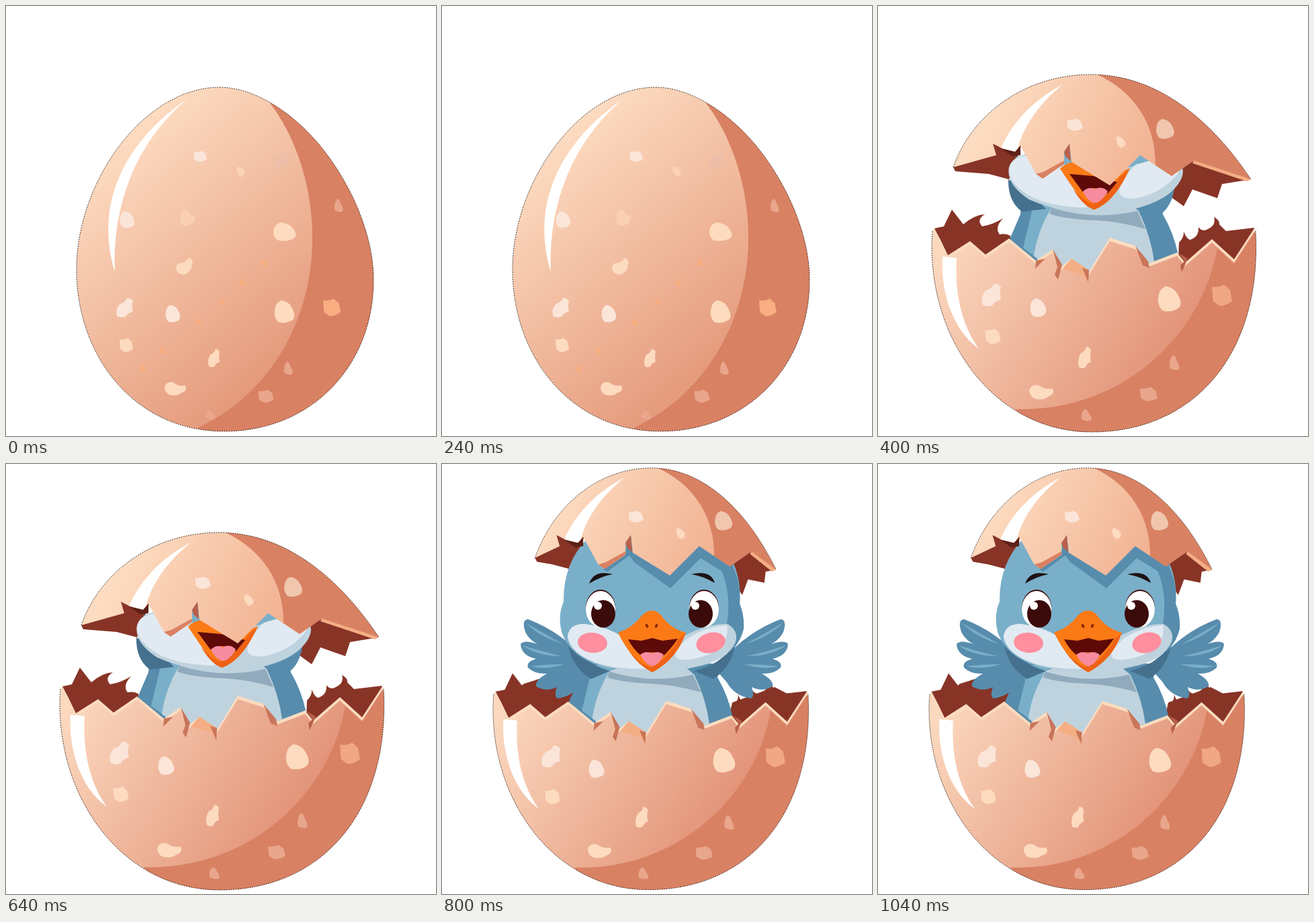
Write an HTML page that moves like this. It is 640x640 px and loops after 1200 ms.

```html
<!DOCTYPE html>
<html lang="en">
<head>
<meta charset="utf-8">
<title>Hatching egg</title>
<style>
  html, body { margin: 0; width: 100%; height: 100%; overflow: hidden; background: #fff; }
  svg { display: block; width: 100vw; height: 100vh; }
</style>
</head>
<body>
<svg id="stage" viewBox="0 0 640 640"></svg>
<script>
const C = {
  shade: '#d98163', inner: '#873426', rim: '#fcdcbf', crack: '#c9755a', peach: '#f5ae84',
  pale: '#fbe5d9', cream: '#fddbbf', dim: '#e9a68c',
  sky: '#7aafc9', blue: '#578cad', navy: '#45718f', mist: '#bfd3de', snow: '#e1eaf2',
  beak: '#fb7a16', beakDark: '#ee6216', mouth: '#5e0a08', tongue: '#f78ba0', ink: '#3b0a0a'
};

const path = (d, fill, extra = '') => `<path d="${d}" fill="${fill}" ${extra}/>`;
const oval = (x, y, rx, ry, fill, turn = 0) =>
  `<ellipse cx="${x}" cy="${y}" rx="${rx}" ry="${ry}" fill="${fill}" transform="rotate(${turn} ${x} ${y})"/>`;
const group = (body, attrs = '') => `<g ${attrs}>${body}</g>`;
const clip = (id, d) => `<clipPath id="${id}"><path d="${d}"/></clipPath>`;
const edge = d => path(d, 'none', 'stroke="#1a0f0c" stroke-width=".8" stroke-dasharray="2 1.5"');
const ramp = (id, x1, y1, x2, y2, from, to) =>
  `<linearGradient id="${id}" gradientUnits="userSpaceOnUse" x1="${x1}" y1="${y1}" x2="${x2}" y2="${y2}">
   <stop stop-color="${from}"/><stop offset="1" stop-color="${to}"/></linearGradient>`;

// Speckle outlines in a 20 by 20 box
const SPOT = {
  square: 'M-10-8Q-3-7 2-10L8-5L10 5Q3 10-3 9L-9 5Z',
  blob: 'M-5-4Q1-5 3-10Q7-10 10-7Q8-1 10 4Q3 6 2 9Q-3 11-8 9Q-11 2-5-4Z',
  drop: 'M-3-10Q3-9 5-2Q12 5 8 9Q0 11-8 7Q-11-2-3-10Z',
  egg: 'M-3-10Q5-9 8-3Q13 5 7 8Q0 11-6 9Q-11 4-9-3Q-8-8-3-10Z',
  bean: 'M-10-2Q-8-10-2-8Q3-2 9-4Q12 3 6 6Q2 11-5 9Q-10 6-10-2Z'
};
const spot = (kind, x, y, w, h, fill, turn = 0) => path(SPOT[kind], fill,
  `transform="translate(${x} ${y}) rotate(${turn}) scale(${w / 20} ${h / 20})"`);

function wholeEgg() {
  const d = 'M318 121C365 121 420 152 466 206C512 262 547 338 547 408C547 535 455 633 325 633C190 633 105 520 105 392C105 262 205 121 318 121Z';
  const dots = [[384, 382], [352, 412], [322, 440], [287, 470], [234, 513], [204, 540]];
  return clip('eggClip', d) + path(d, 'url(#eggFill)') +
    group(path('M393 145C432 195 456 270 456 345C456 470 390 580 285 628L330 660H600V120Z', C.shade), 'clip-path="url(#eggClip)"') +
    path('M269 139C200 185 125 275 162 396C158 310 185 210 269 139Z', '#fff') +
    dots.map(([x, y]) => spot('drop', x, y, 10, 11, '#f7ae80')).join('') +
    spot('square', 289, 224, 20, 17, C.pale) +
    spot('egg', 349, 246, 11, 16, '#fbd3b7', -25) +
    spot('blob', 408, 229, 22, 25, '#eebfa8') +
    spot('drop', 495, 297, 14, 20, C.dim) +
    spot('egg', 180, 318, 22, 25, C.pale) +
    spot('bean', 270, 315, 22, 26, '#fad0b4', 15) +
    spot('egg', 414, 336, 34, 28, C.cream) +
    spot('bean', 266, 387, 28, 22, C.cream, -45) +
    spot('blob', 176, 449, 26, 29, C.pale) +
    spot('egg', 248, 458, 22, 26, C.pale) +
    spot('egg', 414, 455, 30, 34, C.cream) +
    spot('square', 485, 449, 26, 27, '#f9ae82') +
    spot('square', 179, 505, 20, 22, C.cream) +
    spot('blob', 309, 524, 18, 27, C.cream) +
    spot('bean', 252, 569, 32, 22, C.cream) +
    spot('drop', 420, 539, 14, 20, C.dim) +
    spot('square', 387, 581, 23, 20, C.dim) +
    spot('drop', 304, 608, 16, 15, C.dim) + edge(d);
}

const BOWL_EDGE = 'M84 331L93 348L104 371L137 350L160 370L195 346L235 379L260 362L269 391L288 376L313 397L345 345L383 357L403 383L445 367L457 382L497 347L530 377L560 331';
const BOWL_SIDE = 'C572 515 473 634 318 634C170 634 70 490 81 335';
const BOWL = BOWL_EDGE + 'L562 335' + BOWL_SIDE + 'Z';

const bowlBack = () =>
  path('M84 331L98 328L110 303L127 325Q143 311 159 310Q146 318 155 328Q172 325 186 316Q173 330 181 340Q190 338 197 342V375H100Z', C.inner) +
  path('M447 375L448 352Q456 344 455 335Q458 345 464 348Q478 344 477 329Q482 336 489 333Q504 327 500 314Q509 319 508 325L518 335L560 330L545 385L450 390Z', C.inner);

const bowlFront = () =>
  path(BOWL, C.rim) +
  group(path(BOWL, 'url(#bowlFill)', 'transform="translate(0 5)"') +
    path('M507 345C492 480 370 605 205 600L230 650H580V338L560 337L530 384L505 360Z', C.shade), 'clip-path="url(#bowlClip)"') +
  path('M235 379L249 376L234 391Z', C.crack) +
  path('M260 362L274 385L268 407L263 400L267 389Z', C.crack) +
  path('M288 376L314 393L313 411L306 401L275 391Z', C.peach) +
  path('M304 390L314 393L313 411Z', C.crack) +
  path('M383 357L402 380L404 390L394 386Z', C.crack) +
  path('M448 368L461 376L452 396L450 386L456 380Z', '#b9604a') +
  path('M96 373L117 375C114 430 125 475 150 510C108 480 93 420 96 373Z', '#fff') +
  spot('blob', 168, 430, 30, 34, C.pale) +
  spot('egg', 238, 449, 24, 28, C.pale) +
  spot('egg', 433, 436, 34, 38, C.cream) +
  spot('square', 512, 431, 30, 33, '#f0a785') +
  spot('square', 171, 492, 23, 24, C.cream) +
  spot('blob', 307, 523, 20, 32, C.cream) +
  spot('bean', 243, 574, 36, 24, C.cream) +
  spot('drop', 441, 531, 16, 23, C.dim) +
  spot('square', 403, 578, 26, 22, C.dim) +
  spot('drop', 310, 609, 17, 18, C.dim) +
  edge('M562 335' + BOWL_SIDE);

// Broken cap: left and right tips, the two side curves and the inner right wall vary
function cap(id, left, c1, c2, right, wall) {
  const arc = `M${left} 240C${c1} 317 102C${c2} ${right} 258`;
  const d = arc + `L470 230L437 253L390 222L345 267L288 232L285 205L277 217V235L245 257L235 250L212 208L204 217L185 212L171 205L176 222Z`;
  return {
    back: path(`M${left} 240L${left + 3} 246L165 250L195 258L214 206L170 204Z`, C.inner) +
      path(`M${right} 258L${wall}L437 250L470 230Z`, C.inner),
    front: clip(id, d) + path(d, 'url(#capFill)') +
      group(path('M322 100C380 125 414 175 413 238L440 280H600V90Z', C.shade) +
        path('M275 117C230 140 198 175 181 216L207 217C215 180 240 145 275 117Z', '#fff') +
        path('M235 250L246 247L277 230V240L245 260Z', C.shade), `clip-path="url(#${id})"`) +
      path('M277 217L285 205L287 231L279 224Z', '#b9604a') +
      path(`M470 230L${right} 258L${right - 6} 261L468 234Z`, C.peach) +
      path('M183 212L204 217L212 208V222L200 224Z', '#5d2118') +
      spot('square', 293, 177, 23, 19, C.pale) +
      spot('egg', 361, 202, 12, 18, C.cream, -25) +
      spot('egg', 427, 183, 27, 30, '#f0c6ae') + edge(arc)
  };
}

const body = () =>
  path('M214 288L212 310L196 347L250 395L330 405L420 385L446 367Q440 338 424 310L420 288Z', C.blue) +
  path('M232 290L228 310L216 360L250 385L265 290Z', C.sky) +
  path('M258 300Q237 335 232 372L270 402L330 410L411 380Q406 342 388 305L370 290H280Z', C.mist) +
  path('M258 300Q320 320 386 305L398 332Q362 321 325 319Q275 317 255 309Z', '#91aabc');

const peekHead = () =>
  path('M194 258Q193 290 214 306L250 302L225 275Z', C.navy) +
  path('M442 262Q440 295 422 309L395 304L425 275Z', C.blue) +
  path('M205 225L285 203L430 225L448 250H200Z', C.sky) +
  path('M195 240Q190 265 225 288Q270 308 325 309Q400 306 435 278Q460 255 452 238L420 225L375 240H290L230 222Q200 222 195 240Z', C.mist) +
  path('M195 242Q200 222 225 222L277 242L312 300Q265 300 230 285Q193 264 195 242Z', C.snow) +
  path('M359 274Q358 289 385 286Q425 278 448 247L420 226L384 236Q364 256 359 274Z', C.snow) +
  path('M271 242Q280 233 292 232L345 255L375 241Q352 292 322 303Q308 300 271 242Z', C.beak) +
  path('M374 243Q352 292 322 303Q306 299 290 272Q310 295 322 294Q343 284 360 255Z', C.beakDark) +
  path('M285 250L320 253L356 262L342 279Q323 264 305 277Z', C.mouth) +
  path('M305 276Q314 268 323 273Q333 267 342 276Q332 293 322 293Q311 290 305 276Z', C.tongue);

const wing = () =>
  path('M195 272Q165 245 128 231Q118 232 124 250Q130 262 142 268Q122 261 117 268Q118 285 140 290Q125 294 128 303Q138 313 156 312Q138 322 140 331Q155 340 171 332Q166 345 172 349Q197 345 208 325L230 300Z', C.blue) +
  path('M124 236Q145 257 180 268Q142 247 124 236ZM120 270Q142 286 178 286Q145 278 120 270ZM131 301Q155 307 182 298Q155 298 131 301Z', C.sky);

const eye = (x, px, hx) =>
  oval(x, 214, 22, 27, C.ink) + oval(x, 216, 22, 27, '#fff') +
  oval(px, 223, 18, 20.5, C.ink) + oval(hx, 211, 6, 6, '#fff');

const happyHead = () =>
  path('M187 262Q190 300 222 320L250 308Q205 295 187 262Z', C.navy) +
  path('M437 262Q434 300 404 320L375 308Q425 295 437 262Z', C.navy) +
  path('M215 112Q180 150 181 205Q172 225 178 250Q190 285 230 298Q310 320 395 297Q440 280 449 245Q450 225 443 208Q446 170 430 140L340 90Z', C.sky) +
  path('M425 140Q446 170 443 208Q450 225 449 245Q444 267 428 280L424 238Q432 190 412 150Z', C.blue) +
  path('M240 157L274 128V105L340 140L384 115L434 150L430 168L385 140L340 185L286 146L279 136L246 160Z', C.blue) +
  path('M187 258Q188 238 212 238Q245 242 265 255H362Q395 238 425 238Q442 248 437 265Q425 290 390 299Q312 320 235 299Q190 282 187 258Z', C.mist) +
  path('M187 258Q188 238 212 238Q245 242 268 257L304 305Q200 305 187 258Z', C.snow) +
  path('M349 276Q375 244 424 240Q430 278 375 290Q340 296 349 276Z', C.snow) +
  oval(224, 266, 22, 15, '#ff8e9e', 5) + oval(400, 266, 22, 15, '#ff8e9e', -15) +
  eye(236, 240, 232) + eye(390, 385, 377) +
  path('M219 178Q226 157 254 164Q237 167 219 178Z', '#1e1212') +
  path('M406 177Q400 157 371 164Q389 167 406 177Z', '#1e1212') +
  path('M262 251Q285 243 298 225Q313 211 326 225Q340 245 363 251Q350 290 313 310Q283 294 262 251Z', C.beak) +
  path('M362 252Q350 290 313 310Q292 300 278 278Q300 303 313 302Q338 288 352 261Z', C.beakDark) +
  oval(305, 241, 2, 3, '#8f2a0a', -25) + oval(319, 241, 2, 3, '#8f2a0a', 25) +
  path('M277 261L297 263L313 259L328 263L351 260Q341 275 329 286Q312 275 296 285Q284 275 277 261Z', C.mouth) +
  path('M295 284Q303 277 312 282Q322 277 330 284Q323 299 313 301Q302 298 295 284Z', C.tongue);

const lowered = 'transform="translate(-2 16.8) scale(.973)"';
const raised = 'transform="translate(4.5 -93) scale(.97)"';

function peek() {
  const top = cap('capA', 112, '140 160 220 102', '420 102 500 175', 555, '512 265L505 286L468 273L455 298L437 285');
  return top.back + bowlBack() + body() + peekHead() + top.front + bowlFront();
}

function hatched() {
  const top = cap('capB', 138, '165 163 232 102', '397 102 464 168', 508, '492 261L490 278L465 273L456 297L448 285');
  const behindWings = path('M100 345L122 327L158 316L200 340V365H110ZM425 385L432 355L495 332L520 345L500 385Z', C.inner);
  return group(top.back, raised) + group(bowlBack(), lowered) + behindWings + wing() +
    group(wing(), 'transform="translate(632 0) scale(-1 1)"') +
    group(body(), lowered) + happyHead() + group(top.front, raised) + group(bowlFront(), lowered);
}

const stage = document.getElementById('stage');
stage.innerHTML = '<defs>' +
  ramp('eggFill', 165, 200, 435, 510, '#fddcc1', '#e59a7c') +
  ramp('bowlFill', 100, 350, 400, 550, '#fbd8be', '#e3957a') +
  ramp('capFill', 170, 150, 400, 260, '#fddcc1', '#f1b292') +
  clip('bowlClip', BOWL) + '</defs>' +
  [wholeEgg, peek, hatched].map(draw => group(draw(), 'class="pose"')).join('');

const poses = [...stage.querySelectorAll('.pose')];
const start = performance.now();

function update(time) {
  const step = Math.floor(time % 1200 / 400);
  poses.forEach((pose, i) => pose.setAttribute('visibility', i === step ? 'visible' : 'hidden'));
}

function tick() {
  update(performance.now() - start);
  requestAnimationFrame(tick);
}
tick();
</script>
</body>
</html>
```
